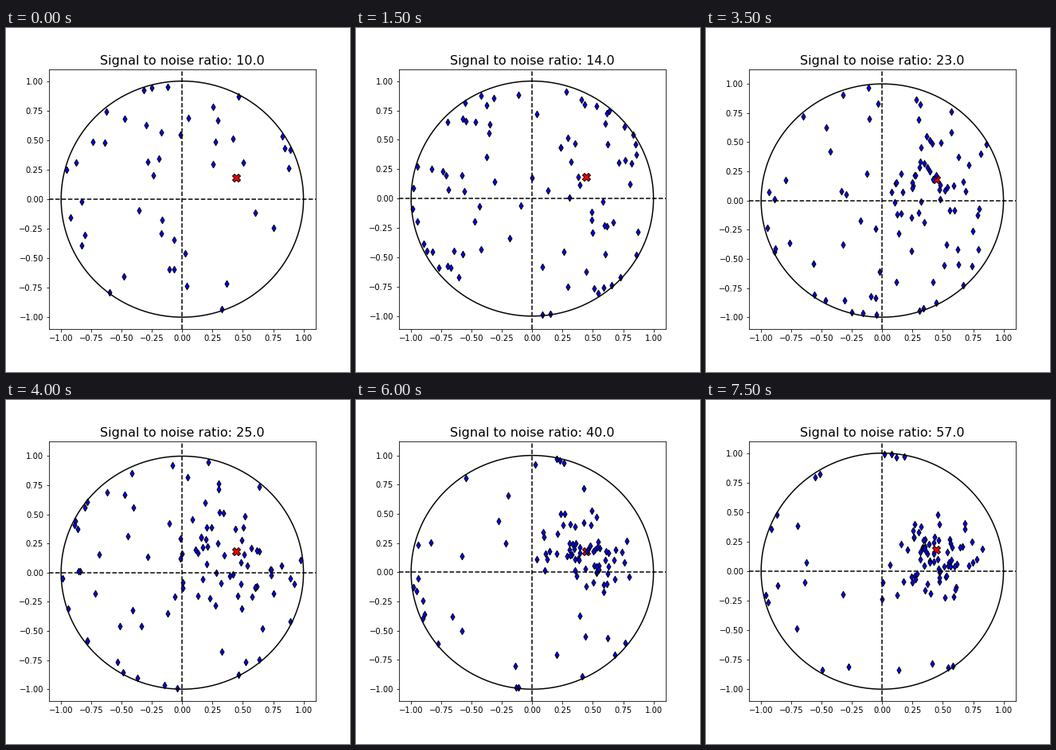
A matplotlib script for the animation above (8000 ms loop, 432 by 432 pixels).

```python
import numpy as np
import matplotlib.pyplot as plt
from matplotlib.animation import FuncAnimation

FRAMES, STEP = 16, 500
TRUTH = np.array([.447, .182])
SNR = np.round(np.logspace(1, 6, 100))[:FRAMES]


def estimates(k):
    """Noisy positions: a tightening cluster plus ambiguous outliers."""
    rng = np.random.default_rng(40 + k)
    snr = SNR[k]
    total = int(97 - 52 * np.exp(-k / 2))
    n_out = int(total * min(.95, .83 * (14 / snr) ** .87))

    # Outliers spread over the disc, then gather on the rim to the left
    theta = np.radians(190) + np.pi * (1 - .022 * k) * rng.uniform(-1, 1, n_out)
    r = (1.1 + .01 * (snr - 14)) * np.sqrt(rng.random(n_out))
    r = np.minimum(r, rng.uniform(.97, .995, n_out))
    outliers = np.column_stack([r * np.cos(theta), r * np.sin(theta)])

    sigma = 1.15 / np.sqrt(snr)
    cluster = rng.normal(TRUTH - (.01, .07), sigma, (total - n_out, 2))
    dist = np.hypot(*cluster.T)[:, None]
    cluster /= np.maximum(1, dist / .985)
    return np.vstack([outliers, cluster])


def y_limits(k):
    """Limits that sway up (+) or down (-) for markers at the rim."""
    sway = np.interp(k, [1, 3, 5, 8, 10, 12, 14],
                     [0, -.009, .02, .026, -.015, .02, 0])
    low, high = -1 + min(sway, 0), 1 + max(sway, 0)
    margin = .05 * (high - low)
    return low - margin, high + margin


plt.rcParams.update({"font.family": "DejaVu Sans", "font.size": 10})
fig, ax = plt.subplots(figsize=(6, 6), dpi=72)
fig.subplots_adjust(left=.125, right=.9, bottom=.125, top=.88)

ax.scatter(*TRUTH, s=100, c="red", marker="X", edgecolors="k", linewidths=1)
dots = ax.scatter([], [], s=36, c="blue", marker="d",
                  edgecolors="k", linewidths=1)
t = np.linspace(0, 2 * np.pi, 400)
ax.plot(np.cos(t), np.sin(t), "k-", lw=1.5)
ax.axhline(0, color="k", ls="--", lw=1.5)
ax.axvline(0, color="k", ls="--", lw=1.5)
ticks = np.arange(-1, 1.01, .25)
ax.set(xticks=ticks, yticks=ticks, xlim=(-1.1, 1.1))
title = ax.set_title("", fontsize=16)


def update(k):
    dots.set_offsets(estimates(k))
    title.set_text(f"Signal to noise ratio: {SNR[k]:.1f}")
    ax.set_ylim(y_limits(k))
    return dots, title


anim = FuncAnimation(fig, update, frames=FRAMES, interval=STEP,
                     repeat=True, repeat_delay=0, blit=False)
plt.show()
```
